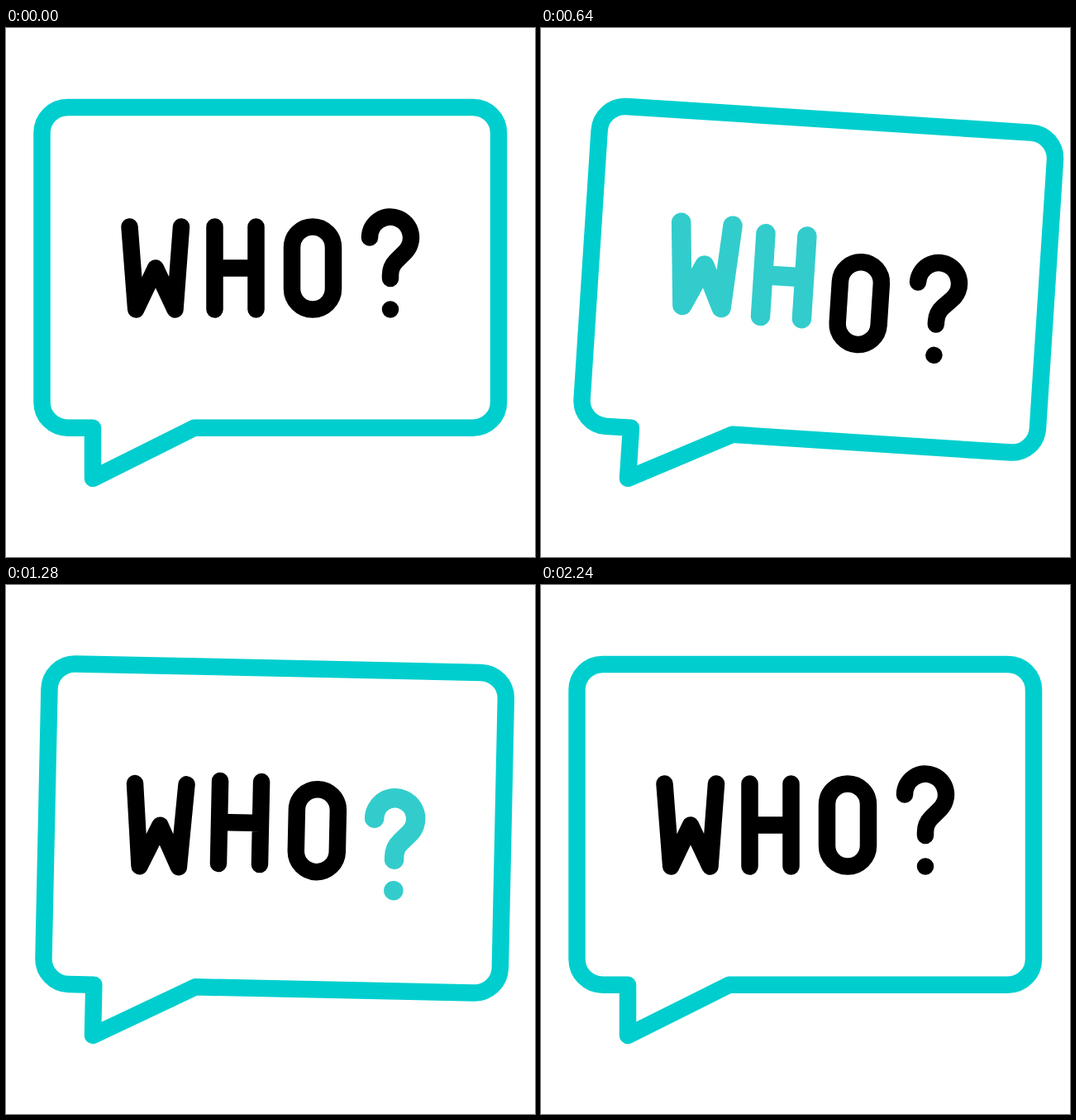
Animation of 640 by 640 pixels, one loop 2600 ms. Source, as an HTML page:

```html
<!DOCTYPE html>
<html lang="en">
<head>
<meta charset="utf-8">
<title>Who?</title>
<style>
  html, body { margin: 0; width: 100%; height: 100%; overflow: hidden; background: #fff; }
  svg { display: block; width: 100vw; height: 100vh; }
  path { fill: none; stroke-width: 20.5; stroke-linecap: round; stroke-linejoin: round; }
  #bubble > path { stroke: #00cece; }
  .letter { stroke: #000; }
  .letter.lit { stroke: #33cccc; }
  .letter.lit path { stroke-width: 23.5; }
</style>
</head>
<body>
<svg viewBox="0 0 640 640" role="img" aria-label="WHO?">
  <g id="bubble">
    <path d="M228 483.7H565A31 31 0 0 0 596 452.7V127A31 31 0 0 0 565 96H74.5A31 31 0 0 0 43.5 127V452.7A31 31 0 0 0 74.5 483.7H105V545Z"/>
    <g class="letter"><path d="M149.5 240.5L157.2 340.5L181 290.5L204.5 340.5L212 240.5"/></g>
    <g class="letter"><path d="M252.5 240.5V340.5M302.5 240.5V340.5M252.5 290.5H302.5"/></g>
    <g class="letter"><path d="M346 265.5A25 25 0 0 1 396 265.5V315.5A25 25 0 0 1 346 315.5Z"/></g>
    <g class="letter"><path d="M440 253.5A25 25 0 1 1 482.7 271.2L472.3 281.6A25 25 0 0 0 465 299.3V303M465 340.5h.01"/></g>
  </g>
</svg>
<script>
  const LOOP = 2600, STEP = 40, LAST = 2240;
  const FIRST = 320, BEAT = 280;          // length of the first swing and of the later ones
  const PIVOT = "105 545";                // tip of the bubble's tail

  const tilt = [0, -4, 4, -2, 2, 0];
  const bounce = [0, 33, -10, 13, -6.7, 6.7, 0];
  const hop = [0, 33, 13, 22.6, 0];

  const bubble = document.getElementById("bubble");
  const letters = [...document.querySelectorAll(".letter")].map((el, i) => ({
    el,
    keys: i < 3 ? bounce : hop,
    delay: 120 * i,
    litFrom: 240 + 240 * i,
    litTo: 720 + 240 * i
  }));

  const ease = p => (1 - Math.cos(Math.PI * p)) / 2;

  // Eased value of a list of swing extremes at time t.
  function swing(keys, t) {
    if (t <= 0) return keys[0];
    const pos = t < FIRST ? t / FIRST : 1 + (t - FIRST) / BEAT;
    const i = Math.floor(pos);
    if (i >= keys.length - 1) return keys[keys.length - 1];
    return keys[i] + (keys[i + 1] - keys[i]) * ease(pos - i);
  }

  function draw(t) {
    bubble.setAttribute("transform", `rotate(${swing(tilt, t)} ${PIVOT})`);
    for (const { el, keys, delay, litFrom, litTo } of letters) {
      el.setAttribute("transform", `translate(0 ${swing(keys, t - delay)})`);
      el.classList.toggle("lit", t >= litFrom && t < litTo);
    }
  }

  const start = performance.now();
  function tick() {
    const t = (performance.now() - start) % LOOP;
    draw(Math.min(LAST, Math.floor(t / STEP) * STEP));
    requestAnimationFrame(tick);
  }
  tick();
</script>
</body>
</html>
```
